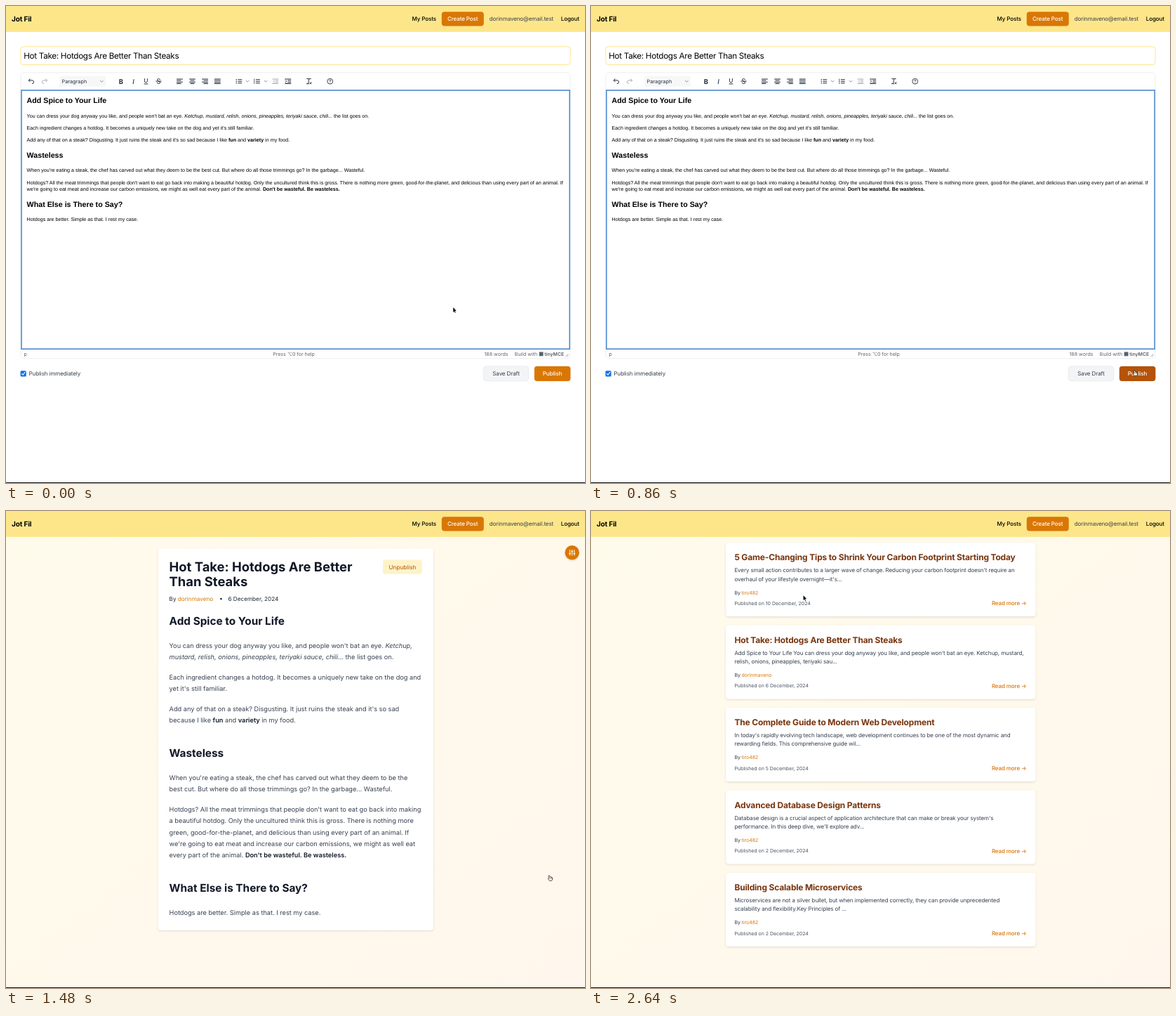
An HTML page for the animation above (2660 ms loop, 825x679 px).

```html
<!DOCTYPE html>
<html lang="en">
<head>
<meta charset="utf-8">
<title>Blog editor</title>
<style>
html, body { margin: 0; width: 100%; height: 100%; overflow: hidden; background: #fff; }
svg { display: block; width: 100vw; height: 100vh; }
text { font-family: Inter, "DejaVu Sans", sans-serif; text-rendering: geometricPrecision; white-space: pre; }
.ui { font-size: 8.02px; letter-spacing: -.0137em; }
.small { font-size: 7.02px; letter-spacing: -.005em; }
.status { font-size: 7.1px; letter-spacing: -.005em; fill: #5f6771; }
.mark { font-size: 6.9px; font-weight: 600; fill: #59616b; }
.pick { font-size: 7.3px; fill: #222f3e; }
.tool { font-size: 9.4px; fill: #222f3e; }
.brand { font-size: 10px; font-weight: 700; letter-spacing: -.012em; }
.field { font-size: 11.7px; letter-spacing: -.026em; }
.doc { font-family: "Liberation Sans", Arial, sans-serif; font-size: 7.16px; }
.docHead { font-family: "Liberation Sans", Arial, sans-serif; font-size: 10.7px; font-weight: 700; }
.prose { font-size: 9.2px; fill: #374151; }
.h1 { font-size: 18.4px; font-weight: 700; fill: #111827; }
.h2 { font-size: 15.33px; font-weight: 700; fill: #111827; }
.meta { font-size: 8.18px; }
.cardHead { font-size: 12px; font-weight: 700; fill: #78350f; letter-spacing: -.014em; }
.med { font-weight: 500; }
.b { font-weight: 700; }
.prose .b { fill: #111827; font-weight: 600; }
.i { font-style: italic; }
</style>
</head>
<body>
<svg id="stage" viewBox="0 0 825 679" preserveAspectRatio="none" xmlns="http://www.w3.org/2000/svg"></svg>
<script>
const LOOP = 2660;
const ORANGE = '#d97706', INK = '#222f3e';
const USER = 'dorinmaveno', MAIL = USER + '@email.test', AUTHOR = 'tiro482';
const TITLE = 'Hot Take: Hotdogs Are Better Than Steaks';

const text = (x, y, cls, s, fill = '', anchor = 'start') =>
  `<text x="${x}" y="${y}" class="${cls}" text-anchor="${anchor}"${fill && ` style="fill:${fill}"`}>${s}</text>`;
const rect = (x, y, w, h, r, fill, extra = '') =>
  `<rect x="${x}" y="${y}" width="${w}" height="${h}" rx="${r}" fill="${fill}" ${extra}/>`;
const line = (d, color = INK, w = 1) =>
  `<path d="${d}" fill="none" stroke="${color}" stroke-width="${w}" stroke-linecap="round" stroke-linejoin="round"/>`;
const group = (id, s) => `<g id="${id}">${s}</g>`;
const bold = s => `<tspan class="b">${s}</tspan>`;
const ital = s => `<tspan class="i">${s}</tspan>`;

// Header
const userNav =
  text(578.5, 21.3, 'ui med', 'My Posts') +
  rect(620.8, 8.2, 60, 20.4, 4, ORANGE) + text(650.7, 21.3, 'ui med', 'Create Post', '#fff', 'middle') +
  text(688.8, 21.3, 'ui', MAIL, '#374151') + text(790.8, 21.3, 'ui med', 'Logout');
const guestNav =
  text(729, 21.3, 'ui', 'Login') +
  rect(757.2, 8.2, 59.8, 20.4, 4, ORANGE) + text(787, 21.3, 'ui med', 'Get Started', '#fff', 'middle');
const header = rect(0, 0, 825, 36.9, 0, '#fde68a') + text(8, 22.1, 'brand', 'Jot Fil');

// Editor toolbar
const bars = (cx, spans, color) =>
  spans.map(([a, b], i) => line(`M${cx + a} ${103.9 + i * 2.15}H${cx + b}`, color, 1.05)).join('');
const chevron = (x, y) => line(`M${x - 2} ${y - 1}l2 2 2-2`, '#777', .8);
const full = [-4, 4];

function toolbar() {
  const gray = '#a9aeb5';
  const rows = f => [-2.5, 0, 2.5].map(d => f(107.2 + d)).join('');
  const list = cx => rows(y => line(`M${cx - 1.2} ${y}h5`, INK, 1.1));
  const dots = rows(y => `<circle cx="328.3" cy="${y}" r=".8" fill="${INK}"/>`);
  const nums = rows(y => line(`M353.8 ${y - .7}v1.3`, INK, .9));
  const indent = (cx, color, dir) => bars(cx, [full, [0, 4], [0, 4], full], color) +
    line(`M${cx - 2.5 - dir} 105.6l${dir * 1.5} 1.5 ${-dir * 1.5} 1.5`, color, .9);
  return line('M34.3 103.8l-2 2 2 2M32.6 105.8h4.6q2.4.2 2.4 2.4t-2.2 2.4') +
    line('M56.7 103.8l2 2-2 2M58.4 105.8h-4.6q-2.4.2-2.4 2.4t2.2 2.4', gray) +
    rect(76, 99.5, 66, 15.2, 1.5, '#f7f7f8') + text(79.5, 109.9, 'pick', 'Paragraph') + chevron(136.3, 107.3) +
    text(163.8, 110.6, 'tool b', 'B', '', 'middle') + text(181.6, 110.6, 'tool i med', 'I', '', 'middle') +
    line('M197.4 103.6v3.2q0 2 2 2t2-2v-3.2M197 110.9h5') +
    line('M219.7 104.9q-.5-1.2-2.2-1.2-2 0-2 1.5 0 1.2 2 1.8 2.2.6 2.2 2t-2.1 1.5q-1.8 0-2.3-1.3M213.8 107.1h7.4') +
    bars(247.5, [full, [-4, 1.6], full, [-4, 1.6]]) +
    bars(265.5, [full, [-2.6, 2.6], full, [-2.6, 2.6]]) +
    bars(283.5, [full, [-1.6, 4], full, [-1.6, 4]]) +
    bars(301.3, [full, full, full, full]) +
    dots + list(332) + chevron(344.2, 107.2) + nums + list(357.6) + chevron(370.2, 107.2) +
    indent(383.8, gray, -1) + indent(401.8, INK, 1) +
    line('M428.6 103.6h5.8M431.9 103.8l-1.5 6.8M428.4 110.7h3M432.8 108.6l2.3 2.3M435.1 108.6l-2.3 2.3', INK, .95) +
    `<circle cx="461.8" cy="107.2" r="3.9" fill="none" stroke="${INK}" stroke-width=".9"/>` +
    line('M460.6 106.2q.1-1.1 1.2-1.1t1.2 1q0 .7-1.2 1.4M461.8 109.1v.1', INK, .85);
}

const docLines = [
  [138.2, 'Add Spice to Your Life', 1],
  [158.7, `You can dress your dog anyway you like, and people won't bat an eye. ${ital('Ketchup, mustard, relish, onions, pineapples, teriyaki sauce, chili...')} the list goes on.`],
  [175.9, `Each ingredient changes a hotdog. It becomes a uniquely new take on the dog and yet it's still familiar.`],
  [193, `Add any of that on a steak? Disgusting. It just ruins the steak and it's so sad because I like ${bold('fun')} and ${bold('variety')} in my food.`],
  [215.7, 'Wasteless', 1],
  [235.9, `When you're eating a steak, the chef has carved out what they deem to be the best cut. But where do all those trimmings go? In the garbage... Wasteful.`],
  [253.5, `Hotdogs? All the meat trimmings that people don't want to eat go back into making a beautiful hotdog. Only the uncultured think this is gross. There is nothing more green, good-for-the-planet, and delicious than using every part of an animal. If`],
  [263.4, `we're going to eat meat and increase our carbon emissions, we might as well eat every part of the animal. ${bold("Don't be wasteful. Be wasteless.")}`],
  [285.6, 'What Else is There to Say?', 1],
  [305.8, 'Hotdogs are better. Simple as that. I rest my case.']
];

const editor =
  rect(0, 0, 825, 679, 0, '#fff') + header + userNav +
  rect(21, 57.8, 783, 25.6, 3.5, '#fff', 'stroke="#fde58c"') + text(25.2, 75.2, 'field', TITLE) +
  rect(21, 94.8, 783, 407, 4.5, '#fff', 'stroke="#ececee" stroke-width=".9"') + toolbar() +
  line('M21 119.6H804M21 488.6H804', '#e4e6ec', .9) +
  rect(22, 120, 781.1, 368.2, 0, 'none', 'id="focus" stroke-width="1.5"') +
  docLines.map(([y, s, head]) => text(29.6, y, head ? 'docHead' : 'doc', s)).join('') +
  rect(188.2, 299.4, .7, 8, 0, '#000', 'id="caret"') +
  text(25.6, 498.2, 'status', 'p') + text(410, 498.2, 'status', 'Press ⌥0 for help', '', 'middle') +
  text(681.5, 498.2, 'status', '188 words') + text(724.8, 498.2, 'status', 'Build with') +
  rect(759.7, 492.5, 5.8, 5.8, 0, '#59616b') + text(767.2, 498.2, 'mark', 'tinyMCE') +
  line('M797.5 499l3.6-3.6M799.6 499l1.5-1.5', '#888', .7) +
  rect(20.6, 519.2, 8.2, 8.2, 1.5, '#0b74e5') + line('M22.6 523.4l1.6 1.7 2.8-3.9', '#fff', 1.1) +
  text(32.6, 526.2, 'ui', 'Publish immediately', '#374151') +
  rect(680.2, 512.8, 64.6, 21, 4, '#f3f4f6', 'id="draft" stroke="#e5e7eb" stroke-width=".7"') +
  text(712.5, 526.2, 'ui', 'Save Draft', '#374151', 'middle') +
  rect(752.8, 512.7, 51.6, 21.3, 4, ORANGE, 'id="publish"') +
  text(778.5, 526.2, 'ui med', 'Publish', '#fff', 'middle');

// Pages on the warm background
const page = rect(0, 0, 825, 679, 0, 'url(#warm)') + header;
const loading = page + guestNav +
  `<path d="M402.7 68.6A10.1 9.2 0 0 0 422.9 68.6A10.6 7.9 0 0 1 402.7 68.6Z" fill="${ORANGE}"/>`;

const proseLines = [
  [194.9, `You can dress your dog anyway you like, and people won't bat an eye. ${ital('Ketchup,')}`],
  [211.2, `${ital('mustard, relish, onions, pineapples, teriyaki sauce, chili...')} the list goes on.`],
  [240, 'Each ingredient changes a hotdog. It becomes a uniquely new take on the dog and'],
  [256.3, `yet it's still familiar.`],
  [284.9, `Add any of that on a steak? Disgusting. It just ruins the steak and it's so sad`],
  [301.2, `because I like ${bold('fun')} and ${bold('variety')} in my food.`],
  [383, `When you're eating a steak, the chef has carved out what they deem to be the`],
  [399.3, 'best cut. But where do all those trimmings go? In the garbage... Wasteful.'],
  [428, `Hotdogs? All the meat trimmings that people don't want to eat go back into making`],
  [444.3, 'a beautiful hotdog. Only the uncultured think this is gross. There is nothing more'],
  [460.6, 'green, good-for-the-planet, and delicious than using every part of an animal. If'],
  [476.9, `we're going to eat meat and increase our carbon emissions, we might as well eat`],
  [493.2, `every part of the animal. ${bold("Don't be wasteful. Be wasteless.")}`],
  [574.9, 'Hotdogs are better. Simple as that. I rest my case.']
];

const slider = (x, y) => line(`M${x} 55.4V63M${x - 1.1} ${y}h2.2`, '#fff', 1);
const article = page + userNav +
  rect(216.8, 53.6, 392.2, 543, 4, '#fff', 'filter="url(#shade)"') +
  text(232.6, 86.2, 'h1', 'Hot Take: Hotdogs Are Better') + text(232.6, 106.7, 'h1', 'Than Steaks') +
  rect(537, 69.4, 55.8, 20.4, 3.5, '#fef3c7') + text(564.9, 82.7, 'meta', 'Unpublish', '#b45309', 'middle') +
  text(232.6, 127.8, 'meta', 'By', '#1f2937') + text(244.8, 127.8, 'meta', USER, ORANGE) +
  '<circle cx="306.4" cy="125.1" r="1.4" fill="#1f2937"/>' +
  text(316.5, 127.8, 'meta', '6 December, 2024', '#1f2937') +
  text(232.6, 162.4, 'h2', 'Add Spice to Your Life') + text(232.6, 350.2, 'h2', 'Wasteless') +
  text(232.6, 542.2, 'h2', 'What Else is There to Say?') +
  proseLines.map(([y, s]) => text(232.6, y, 'prose', s)).join('') +
  `<circle cx="806.6" cy="59.2" r="10.2" fill="${ORANGE}" filter="url(#shade)"/>` +
  slider(803.4, 60.6) + slider(806.6, 57.8) + slider(809.8, 60.6);

const posts = [
  ['5 Game-Changing Tips to Shrink Your Carbon Footprint Starting Today',
    `Every small action contributes to a larger wave of change. Reducing your carbon footprint doesn't require an`,
    `overhaul of your lifestyle overnight—it's...`, AUTHOR, 10],
  [TITLE, `Add Spice to Your Life You can dress your dog anyway you like, and people won't bat an eye. Ketchup, mustard,`,
    'relish, onions, pineapples, teriyaki sau...', USER, 6],
  ['The Complete Guide to Modern Web Development',
    `In today's rapidly evolving tech landscape, web development continues to be one of the most dynamic and`,
    'rewarding fields. This comprehensive guide wil...', AUTHOR, 5],
  ['Advanced Database Design Patterns',
    `Database design is a crucial aspect of application architecture that can make or break your system's`,
    `performance. In this deep dive, we'll explore adv...`, AUTHOR, 2],
  ['Building Scalable Microservices',
    'Microservices are not a silver bullet, but when implemented correctly, they can provide unprecedented',
    'scalability and flexibility.Key Principles of ...', AUTHOR, 2]
];
const card = ([head, a, b, author, day], i) => `<g transform="translate(0 ${i * 117.45})">` +
  rect(192.2, 45.4, 441, 104.6, 4, '#fff', 'filter="url(#shade)"') +
  text(204.4, 70.4, 'cardHead', head) +
  text(204.4, 87.4, 'ui', a, '#374151') + text(204.4, 99.6, 'ui', b, '#374151') +
  text(204.4, 118.6, 'small', 'By', '#374151') + text(214.6, 118.6, 'small', author, ORANGE) +
  text(204.4, 133.9, 'small', `Published on ${day} December, 2024`, '#4b5563') +
  text(620.6, 134.3, 'ui med', 'Read more →', ORANGE, 'end') + '</g>';
const feed = page + userNav + posts.map(card).join('');

const scenes = { editor, loading, article, feed };
const stage = document.getElementById('stage');
stage.innerHTML = `<defs>
  <linearGradient id="warm" x1="0" y1="0" x2="1" y2="1"><stop stop-color="#fffbeb"/><stop offset="1" stop-color="#fff7ed"/></linearGradient>
  <filter id="shade" x="-10%" y="-10%" width="120%" height="130%"><feDropShadow dx="0" dy="1.2" stdDeviation="1.4" flood-color="#000" flood-opacity=".12"/></filter>
  </defs>` +
  Object.keys(scenes).map(k => group(k, scenes[k])).join('') +
  rect(0, 678, 825, 1, 0, '#111') +
  group('arrow', '<path d="M0 .4V7.2L1.5 5.7 2.6 8.1 3.5 7.7 2.5 5.3H4.5Z" fill="#000" stroke="#fff" stroke-width=".6" paint-order="stroke"/>') +
  group('hand', '<path d="M-2.5-3.2Q-1.6-4.2-.8-2.9L.1-1.4Q2.5-1.5 3.1.4V1.8Q2.8 3.7 1.5 4H-1.1Q-2.2 2.8-3.2 1.1-3.1.1-2 .5L-1.4.8Z" fill="#fff" stroke="#222" stroke-width=".8"/>' +
    line('M.4-.9V1M1.5-.9V1M2.4-.5V1', '#222', .4));

const $ = id => document.getElementById(id);
const at = (keys, t) => keys.filter(k => k[0] <= t).pop();

// Cursor stops: time, x, y, hand?
const stops = [[0, 637.2, 428.7]];
for (let k = 1; k <= 6; k++) {
  const p = k / 6, q = 1 - p;
  const bez = (a, b, c) => q * q * a + 2 * p * q * b + p * p * c;
  stops.push([70 + (k - 1) * 94, bez(637.2, 690, 750), bez(428.7, 520, 513)]);
}
stops.push([640, 762, 517.5], [720, 775.6, 522.3, 1], [2560, 773.6, 516], [2580, 420, 250], [2610, 120, 60], [2640, 302.6, 119.8]);

const sceneKeys = [[0, 'editor'], [1450, 'loading'], [1480, 'article'], [2610, 'feed']];
const publishKeys = [[0, ORANGE], [640, '#d17106'], [720, '#c26107'], [860, '#b45309']];
const draftKeys = [[0, '#f3f4f6'], [446, '#ecedf0'], [540, '#e5e7eb'], [640, '#eeeff2'], [720, '#f3f4f6']];
const focusKeys = [[0, '#4484cc'], [1180, '#8fb3e0'], [1240, '#c9d5ee'], [1290, '#e6e8f3']];
const caretKeys = [[0, 0], [164, 1], [720, 0], [1130, 1], [1180, 0]];

function draw(t) {
  const scene = at(sceneKeys, t)[1];
  for (const k in scenes) $(k).style.display = k === scene ? '' : 'none';
  $('publish').setAttribute('fill', at(publishKeys, t)[1]);
  $('draft').setAttribute('fill', at(draftKeys, t)[1]);
  $('focus').setAttribute('stroke', at(focusKeys, t)[1]);
  $('caret').setAttribute('opacity', at(caretKeys, t)[1]);
  const [, x, y, hand] = at(stops, t);
  $('arrow').style.display = hand ? 'none' : '';
  $('hand').style.display = hand ? '' : 'none';
  $(hand ? 'hand' : 'arrow').setAttribute('transform', `translate(${x} ${y})`);
}

const start = performance.now();
function tick() {
  draw((performance.now() - start) % LOOP);
  requestAnimationFrame(tick);
}
draw(0);
requestAnimationFrame(tick);
</script>
</body>
</html>
```
